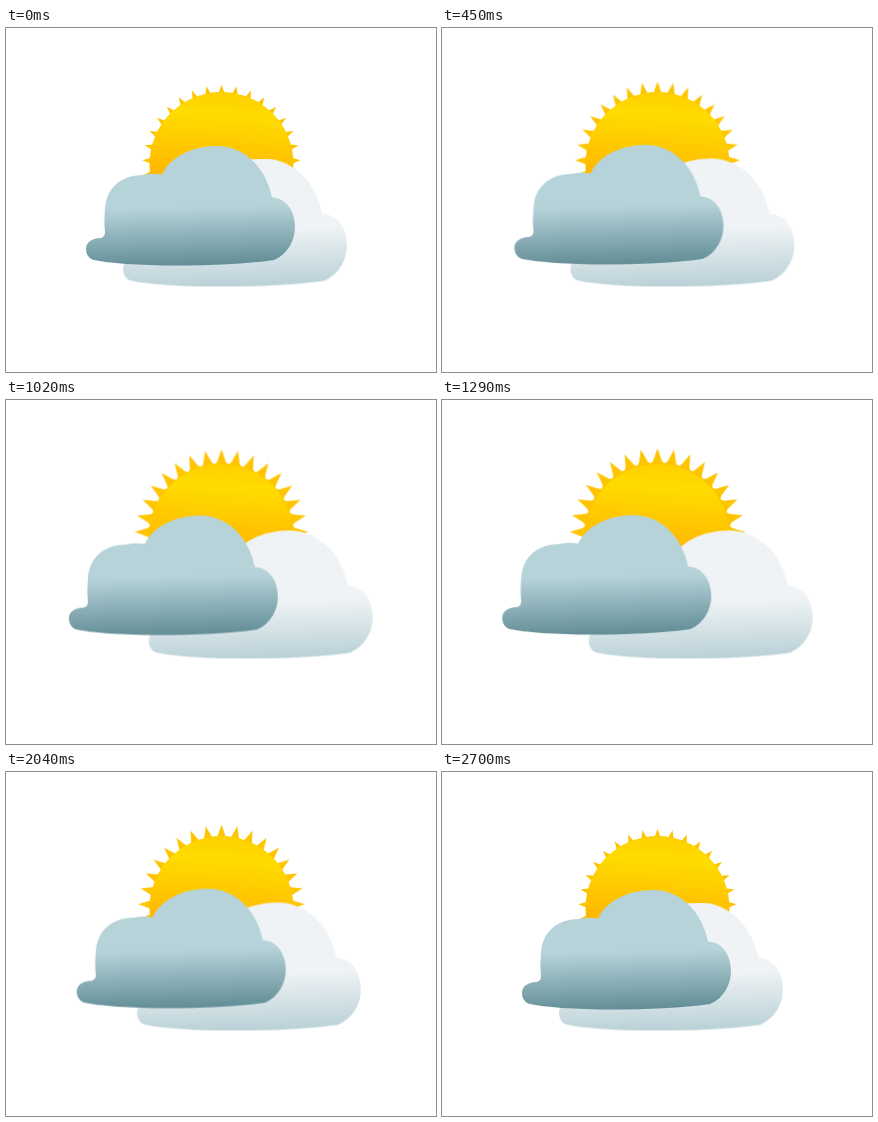
These frames come from a looping animation (430x344 px, 2730 ms). An HTML page:

```html
<!DOCTYPE html>
<html lang="en">
<head>
<meta charset="utf-8">
<title>Partly cloudy</title>
<style>
  html, body { margin: 0; width: 100%; height: 100%; overflow: hidden; background: #fff; }
  svg { display: block; width: 430px; height: 344px; }
  #rays { transform-origin: 215.5px 136px; }
</style>
</head>
<body>
<svg viewBox="0 0 430 344">
  <defs>
    <linearGradient id="gold" gradientUnits="userSpaceOnUse" x1="218" y1="64" x2="212" y2="146">
      <stop offset="0" stop-color="#ffcf00"/>
      <stop offset=".27" stop-color="#ffdc00"/>
      <stop offset="1" stop-color="#ffb900"/>
    </linearGradient>
    <linearGradient id="slate" gradientUnits="userSpaceOnUse" x1="184" y1="179" x2="185.6" y2="238">
      <stop offset="0" stop-color="#b7d3da"/>
      <stop offset="1" stop-color="#628d96"/>
    </linearGradient>
    <linearGradient id="mist" gradientUnits="userSpaceOnUse" x1="184" y1="185" x2="185.6" y2="238">
      <stop offset="0" stop-color="#eff3f5"/>
      <stop offset="1" stop-color="#b9d1d7"/>
    </linearGradient>
    <path id="cloud" d="M99 204C98 196 98.500 188 99 180C101 158 117 147 137 147C144 145.500 150 145.500 156 146.500
      C164 129 186 118 211 118C239 118 260 140 266 169.500C280 170 289 183 289 199C289 212 282 226 268 232
      C240 236 205 237.500 170 237.500C135 237.500 100 235 88 232C83 231 80 226 80 221C80 214 86 210 95 210C98 209 99 207 99 204Z"/>
  </defs>
  <path id="rays" fill="#ffc400"/>
  <circle cx="215.5" cy="136" r="72" fill="url(#gold)"/>
  <g id="back">
    <use href="#cloud" fill="url(#mist)" transform="translate(117 130.5) scale(1.0717) translate(-80 -118)"/>
  </g>
  <g id="front">
    <use href="#cloud" fill="url(#slate)"/>
  </g>
</svg>
<script>
  const STEP = 30, OUT = 41, BACK = 49, TOTAL = 91;
  const $ = id => document.getElementById(id);

  // Spikes with straight sides and rounded valleys
  function raysPath(count, tip, shoulder, valley) {
    const gap = 2 * Math.PI / count;
    const at = (r, a) =>
      (215.5 + r * Math.sin(a)).toFixed(2) + ' ' + (136 - r * Math.cos(a)).toFixed(2);
    let d = '';
    for (let i = 0; i < count; i++) {
      const a = i * gap;
      d += (i ? 'L' : 'M') + at(tip, a) + 'L' + at(shoulder, a + gap * .3) +
        'Q' + at(valley, a + gap / 2) + ' ' + at(shoulder, a + gap * .7);
    }
    return d + 'Z';
  }

  // Steady move out, slower move back, one step of rest
  function sway(id, rest, peak) {
    $(id).animate([
      { transform: rest, offset: 0, easing: `steps(${OUT})` },
      { transform: peak, offset: OUT / TOTAL, easing: `steps(${BACK})` },
      { transform: rest, offset: (OUT + BACK) / TOTAL },
      { transform: rest, offset: 1 }
    ], { duration: TOTAL * STEP, iterations: Infinity });
  }

  $('rays').setAttribute('d', raysPath(33, 79.2, 68, 64));
  sway('rays', 'scale(1)', 'scale(1.115)');
  sway('back', 'translate(0px, 0px)', 'translate(31px, 0px)');
  sway('front', 'translate(0px, 0px)', 'translate(-20.6px, -3px)');
</script>
</body>
</html>
```
